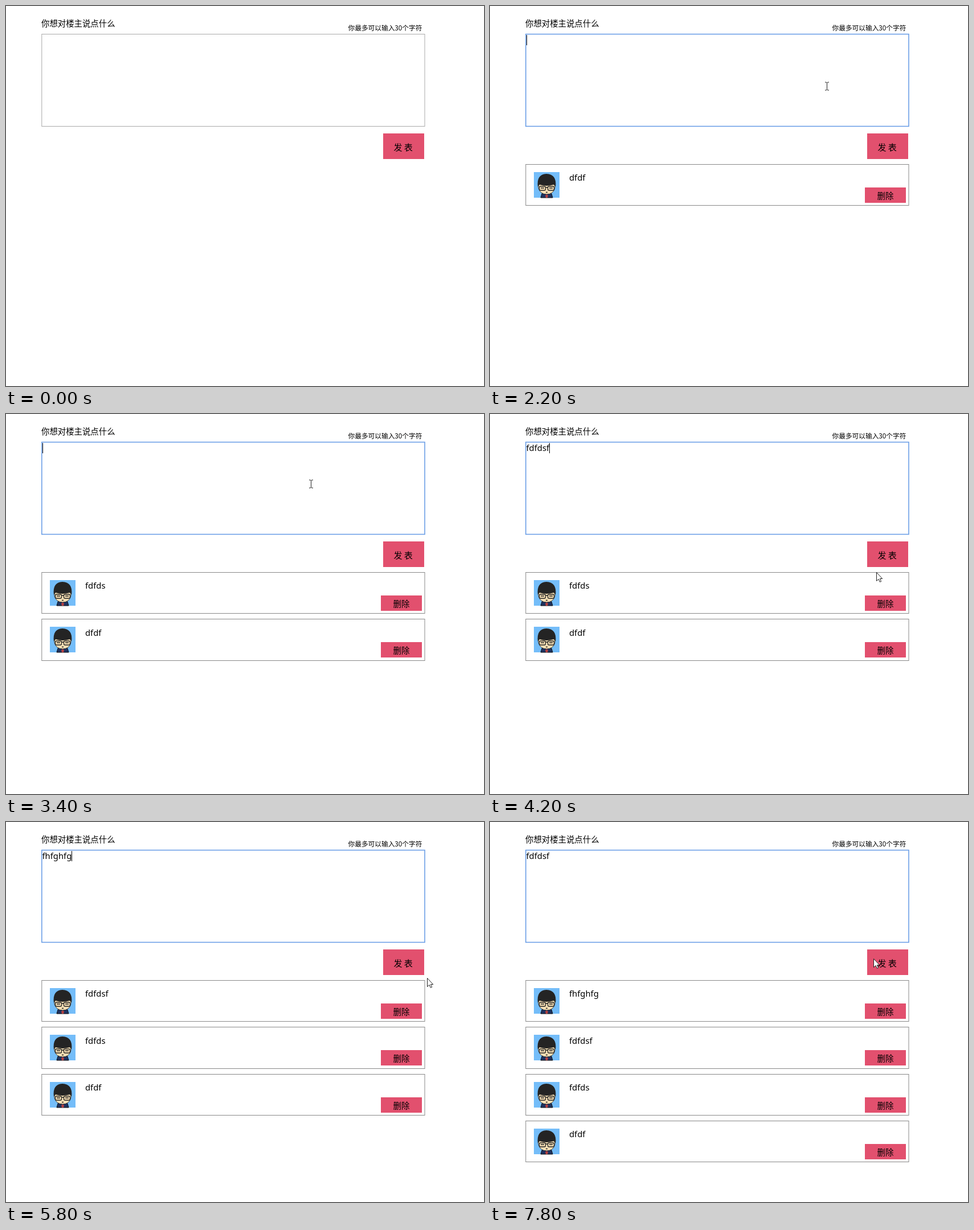
These frames come from a looping animation (839 by 668 pixels, 8 s). An HTML page:

```html
<!DOCTYPE html>
<html lang="zh-CN">
<head>
<meta charset="utf-8">
<style>
  html, body { margin: 0; width: 100%; height: 100%; overflow: hidden; background: #fff; }
  svg { display: block; }
  text { font: 350 14.4px "Noto Sans CJK SC", "Noto Sans CJK", sans-serif; white-space: pre; }
  .small { font-size: 11.7px; }
  .post { font-size: 15px; }
  .latin { font: 14.8px "Noto Sans", sans-serif; }
</style>
</head>
<body>
<svg width="839" height="668" viewBox="0 0 839 668">
  <defs>
    <g id="avatar">
      <path fill="#74bdf9" d="M0 0H45V45H0Z"/>
      <path fill="#1d3260" stroke="#111" d="M12 45L14 38L20 35H26L31 38L33 45Z"/>
      <path fill="#b5403f" d="M20 41L22.500 39L25 41L24 45H21Z"/>
      <path fill="#f6dfb4" stroke="#222" stroke-width=".8" d="M8 20H37V28Q34 39 22.500 39Q11 39 8 28Z"/>
      <path fill="#242424" d="M7 26Q4 4 22 3Q41 4 38 26L35 22Q22 26 10 22Z"/>
      <g fill="none" stroke="#222" stroke-width="1.300">
        <rect x="9.500" y="25" width="11" height="7" rx="2"/>
        <rect x="24.500" y="25" width="11" height="7" rx="2"/>
        <path d="M20.500 27H24.500M12 28H18M27 28H33M21 35.500H24"/>
      </g>
    </g>
  </defs>
  <text x="62" y="35.500">你想对楼主说点什么</text>
  <text x="600.500" y="42.700" class="small">你最多可以输入30个字符</text>
  <rect id="area" x="62.800" y="49.500" width="672.200" height="162" fill="none"/>
  <text id="input" class="latin" x="63.500" y="65"></text>
  <rect id="caret" y="51" width="1" height="18"/>
  <rect x="662" y="224" width="72" height="45" fill="#e2506e"/>
  <rect id="ring" x="661.500" y="223.500" width="72" height="46" fill="none" stroke="#7f86e6"/>
  <text x="680.500" y="253.500" class="post">发 表</text>
  <g id="list"></g>
  <g id="pointer">
    <path id="arrow" fill="#fff" stroke="#222" d="M.5 .5V15.500L4 12.300L6.300 17.300L8.600 16.300L6.400 11.500H10.700Z"/>
    <path id="beam" fill="none" stroke="#222" d="M-3 -7H-1L.5 -6L2 -7H4M.5 -6V6M-3 7H-1L.5 6L2 7H4"/>
  </g>
</svg>
<script>
const LOOP = 8000, STEP = 100, BLINK = 500, PITCH = 82.33;
const ENTRY = { x: 800, y: 116 };
const $ = id => document.getElementById(id);
const at = (x, y) => ({ x, y });

// The pointer rests in the box, types, then glides to the button and presses it.
// `bend` and `back` are control points of the curved glides there and back.
const comments = [
  { text: 'dfdf', focus: 700, start: 800, delay: 180, post: 1900, rest: at(459, 141), press: at(698, 240) },
  { text: 'fdfds', focus: 2200, start: 2300, delay: 75, post: 3100, rest: at(591, 141), press: at(715, 242) },
  { text: 'fdfdsf', focus: 3400, start: 3500, delay: 60, post: 4300, rest: at(535, 123), press: at(690, 250), bend: at(671, 353) },
  { text: 'fhfghfg', focus: 4600, start: 5000, delay: 65, post: 6000, rest: at(488, 97), press: at(705, 245), bend: at(843, 359) },
  { text: 'fdfdsf', focus: 6800, start: 6900, delay: 80, post: LOOP, rest: at(530, 160), press: at(673, 240), back: at(386, 227) }
];

const clamp = (v, lo, hi) => Math.min(hi, Math.max(lo, v));

function glide(a, b, control, u) {
  u = clamp(u, 0, 1);
  const c = control || at((a.x + b.x) / 2, (a.y + b.y) / 2);
  const mix = k => Math.round((1 - u) ** 2 * a[k] + 2 * u * (1 - u) * c[k] + u * u * b[k]);
  return at(mix('x'), mix('y'));
}

function pointerAt(t, index) {
  const { text, focus, start, delay, rest, press, bend, back } = comments[index];
  const leave = start + (text.length - 1) * delay;
  if (t >= leave) return glide(rest, press, bend, (t - leave) / (bend ? 500 : 350));
  if (!index) return glide(ENTRY, rest, null, t / 500);
  const { post, press: from } = comments[index - 1];
  const begin = Math.max(post, focus - 500);
  return glide(from, rest, back, (t - begin) / (focus - begin));
}

const show = (id, on) => $(id).setAttribute('visibility', on ? 'visible' : 'hidden');

function card(text, i) {
  const y = offset => Math.round(offset + i * PITCH);
  const top = y(278.1), bottom = y(350.4), button = y(319.1);
  return `<rect x="62.8" y="${top + 0.5}" width="672.2" height="${bottom - top}" fill="#fff" stroke="#888"/>
    <use href="#avatar" x="77" y="${y(292.1)}"/>
    <text class="latin" x="139" y="${y(307.4)}">${text}</text>
    <rect x="658" y="${button}" width="72" height="${y(346.1) - button}" fill="#e2506e"/>
    <text x="679.5" y="${y(339)}">删除</text>`;
}

let shown = -1;
function drawList(count) {
  if (count === shown) return;
  shown = count;
  $('list').innerHTML = comments.slice(0, count).reverse().map((c, i) => card(c.text, i)).join('');
}

function draw(now) {
  const t = Math.floor(now % LOOP / STEP) * STEP;
  const posted = comments.filter(c => t >= c.post).length;
  const { text, focus, start, delay } = comments[posted];
  const focused = t >= focus;
  const typed = clamp(Math.floor((t - start) / delay) + 1, 0, text.length);
  const lastKey = typed ? start + (typed - 1) * delay : focus;

  drawList(posted);
  $('input').textContent = text.slice(0, typed);
  const width = typed ? $('input').getComputedTextLength() : 0;
  $('caret').setAttribute('x', Math.round(63.5 + width));
  show('caret', focused && Math.floor((t - lastKey) / BLINK) % 2 === 0);
  show('ring', posted > 0 && !focused);
  $('area').setAttribute('stroke', focused ? '#6c9fe6' : '#a9a9a9');
  $('area').setAttribute('stroke-width', focused ? 1.6 : 1);

  const { x, y } = pointerAt(t, posted);
  const inside = x > 62 && x < 735 && y > 49 && y < 212;
  $('pointer').setAttribute('transform', `translate(${x} ${y})`);
  show('beam', t > 0 && inside);
  show('arrow', t > 0 && !inside);
}

const begin = performance.now();
function tick() {
  draw(performance.now() - begin);
  requestAnimationFrame(tick);
}
tick();
</script>
</body>
</html>
```
